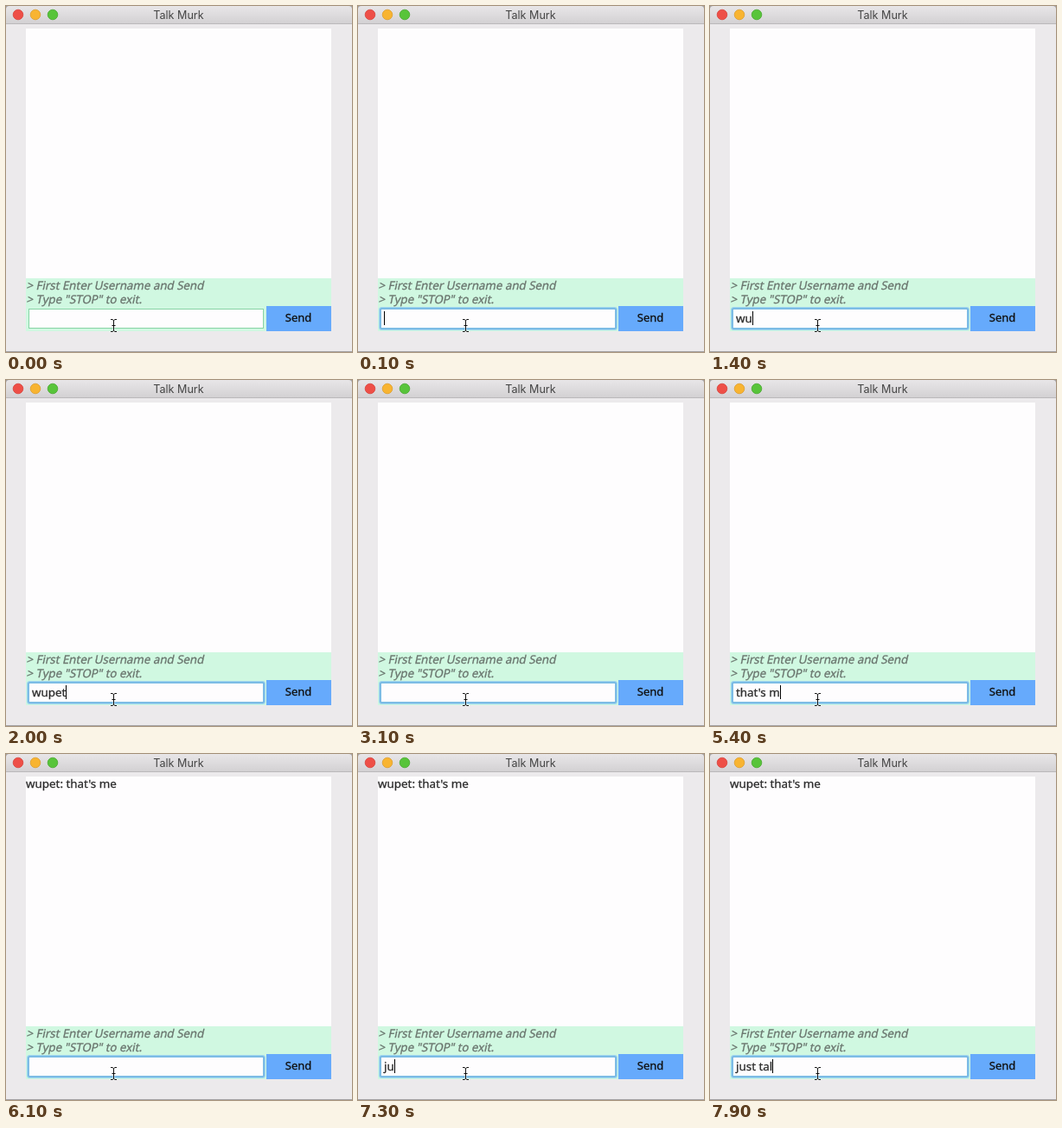
These frames come from a looping animation (400 px wide and 399 px high, 8000 ms). An HTML page:

```html
<!DOCTYPE html>
<html lang="en">
<head>
<meta charset="utf-8">
<title>Talk Murk</title>
<style>
  html, body { margin: 0; width: 100%; height: 100%; overflow: hidden; }
  svg { display: block; width: 400px; height: 399px; }
  text {
    font: 13.4px "Noto Sans", "Open Sans", sans-serif;
    fill: #2c2c2c; stroke: #2c2c2c; stroke-width: .3px; white-space: pre;
  }
  .title { font: 12.6px Inter, Roboto, sans-serif; fill: #444; stroke: none; text-anchor: middle; }
  .hint { font-size: 13.3px; fill: #6a756e; stroke: #6a756e; }
  .send { font-size: 13px; fill: #111; stroke: #111; text-anchor: middle; }
</style>
</head>
<body>
<svg viewBox="0 0 400 399">
  <defs>
    <linearGradient id="bar" x2="0" y2="1">
      <stop stop-color="#e8e6e8"/>
      <stop offset="1" stop-color="#d3d1d3"/>
    </linearGradient>
  </defs>
  <rect width="400" height="399" fill="#a4a2a4"/>
  <path d="M0 20V4q0-4 4-4h392q4 0 4 4v16z" fill="url(#bar)"/>
  <rect y="20" width="400" height="1" fill="#bab8ba"/>
  <rect y="21" width="400" height="377" fill="#eceaec"/>
  <g stroke-width=".8">
    <circle cx="14" cy="10" r="5.8" fill="#ee4f47" stroke="#d9433c"/>
    <circle cx="34" cy="10" r="5.8" fill="#f8b431" stroke="#dd9d2b"/>
    <circle cx="54" cy="10" r="5.8" fill="#58c43a" stroke="#48a92f"/>
  </g>
  <text class="title" x="199.5" y="15">Talk Murk</text>

  <rect x="23" y="26" width="353" height="288" fill="#fefdfe"/>
  <text id="message" x="23" y="39"></text>

  <rect x="23" y="314" width="353" height="61" fill="#d0f8e1"/>
  <text class="hint" transform="translate(23.5 327) skewX(-12)">&gt; First Enter Username and Send</text>
  <text class="hint" transform="translate(23.5 343) skewX(-12)">&gt; Type "STOP" to exit.</text>

  <rect x="26.5" y="349.5" width="271" height="22" fill="#fefdfe" stroke="#86d3a4"/>
  <g id="ring" fill="none">
    <rect x="25.5" y="348.5" width="273" height="24" rx="2" stroke="#9fd6ee" stroke-width="3"/>
    <rect x="26" y="349" width="272" height="23" rx="1" stroke="#72b4e2" stroke-width="1.5"/>
  </g>
  <text id="input" x="30" y="365"></text>
  <rect id="caret" y="352" width="1" height="16" fill="#000"/>

  <rect x="301" y="346" width="75" height="29" fill="#66aafc"/>
  <text class="send" x="338" y="364">Send</text>

  <g fill="none" stroke="#fff" stroke-width="2" stroke-opacity=".6">
    <path id="beam" d="M121 361.5h2l1.5 1l1.5-1h2M124.5 362.5v12M121 375.5h2l1.5-1l1.5 1h2M122.5 368.5h4"/>
  </g>
  <g fill="none" stroke="#111"><path d="M121 361.5h2l1.5 1l1.5-1h2M124.5 362.5v12M121 375.5h2l1.5-1l1.5 1h2M122.5 368.5h4"/></g>
</svg>
<script>
const LOOP = 8000, BLINK = 500, KEY = 100;
const FOCUS = 100, SENT = 5600;
const USER = "wupet", LINE = "that's me", NEXT = "just talk";
const [message, ring, input, caret] =
  ["message", "ring", "input", "caret"].map(id => document.getElementById(id));

// Characters typed so far when the first one lands at `start`.
const typed = (text, start, t) =>
  text.slice(0, Math.max(0, Math.floor((t - start) / KEY) + 1));

function inputText(t) {
  if (t < 1400) return "";
  if (t < 1700) return USER.slice(0, 2);
  if (t < 2600) return USER.slice(0, 2) + typed(USER.slice(2), 1700, t);
  if (t < 4700) return "";
  if (t < SENT) return typed(LINE, 4700, t);
  return typed(NEXT, 7200, t);
}

// The caret restarts its blink on focus, on each key and after sending.
function caretOn(t) {
  if (t < FOCUS) return false;
  if ((t >= 1400 && t < 1900) || (t >= 4600 && t < SENT) || t >= 7200) return true;
  const start = [SENT, 2600, 1900, FOCUS].find(s => t >= s);
  return Math.floor((t - start) / BLINK) % 2 === 0;
}

function setText(node, text) {
  if (node.textContent !== text) node.textContent = text;
}

function draw(t) {
  setText(message, t >= SENT ? `${USER}: ${LINE}` : "");
  setText(input, inputText(t));
  ring.style.display = t >= FOCUS ? "" : "none";
  caret.style.display = caretOn(t) ? "" : "none";
  caret.setAttribute("x", Math.round(30 + input.getComputedTextLength()));
}

const origin = performance.now();
function tick() {
  draw((performance.now() - origin) % LOOP);
  requestAnimationFrame(tick);
}
tick();
</script>
</body>
</html>
```
